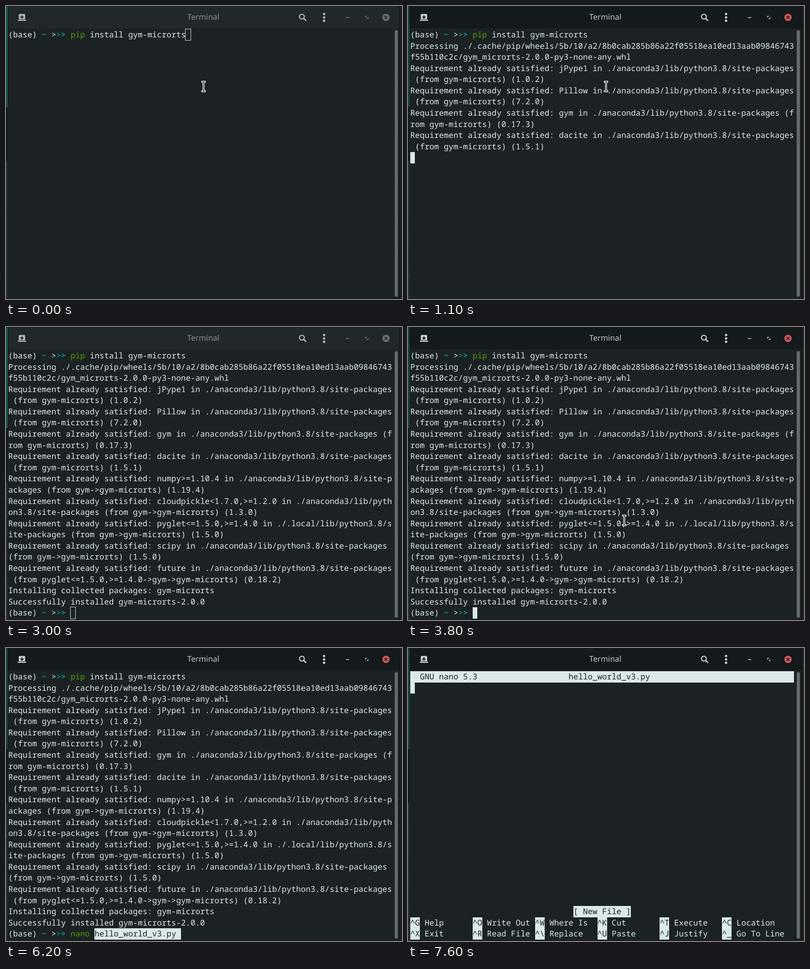
Animation of 869x644 px, one loop 8 s. Source, as an HTML page:

```html
<!DOCTYPE html>
<html lang="en">
<head>
<meta charset="utf-8">
<title>Terminal</title>
<style>
  :root { --bg: #1c2223; --fg: #dbe9e9; --dim: #5a6061; --cw: 10.5375px; --lh: 24.585px; --f: 0%; }
  html, body { margin: 0; width: 100%; height: 100%; overflow: hidden; background: #1c2223; }
  #stage { position: relative; width: 869px; height: 644px; overflow: hidden; background: #15191a; }
  #stage > * { position: absolute; }
  .hatch { background: repeating-linear-gradient(45deg, #363b3c 0 1.5px, #24292a 1.5px 4px); }
  #left { left: 0; top: 340px; width: 3px; height: 304px; }
  #right { left: 863px; top: 0; width: 6px; height: 644px; }
  #shade { left: 863px; top: 0; width: 6px; height: 644px; background: linear-gradient(90deg, #0009, #0002); }
  #edge { left: 1px; top: 1px; width: 2px; height: 221px;
    background: color-mix(in srgb, #16594c var(--f), #1c7c6a); }
  #win { left: 3px; top: 1px; width: 860px; height: 642px; background: var(--bg); border-radius: 3px 3px 0 0; }
  #bar { left: 3px; top: 1px; width: 860px; height: 48px; border-radius: 3px 3px 0 0;
    background: color-mix(in srgb, #14191b var(--f), #20282a); }
  #title { left: 333px; top: 13px; width: 200px; text-align: center; font: 17.2px/24px "Noto Sans", sans-serif;
    text-rendering: geometricPrecision; color: color-mix(in srgb, #c3caca var(--f), #8b9293); }
  #icons { left: 0; top: 0; }
  .strong { color: color-mix(in srgb, #cbd1d1 var(--f), #b3b9ba); }
  .weak { color: color-mix(in srgb, #929899 var(--f), #5d6566); }
  .close { color: color-mix(in srgb, #cc575d var(--f), #646b6c); }
  .hole { color: color-mix(in srgb, #14191b var(--f), #20282a); }
  #scroll { left: 852.5px; top: 53px; width: 7px; height: 586px; border-radius: 3.5px; background: #626a6a; }
  #text, #cursor { margin: 0; font: 17.5625px/var(--lh) "Noto Sans Mono", monospace; white-space: pre;
    text-rendering: geometricPrecision; font-variant-ligatures: none; font-kerning: none; color: var(--fg); }
  #text { left: 4.9px; top: 51px; }
  #text div { height: var(--lh); }
  #cursor { width: var(--cw); height: var(--lh); color: var(--bg); background: var(--fg); }
  #cursor.dim { background: var(--dim); }
  #cursor.hollow { background: none; margin: -1.3px; border: 1.3px solid var(--fg); }
  #cursor.off { display: none; }
  .c { color: #06989a; }
  .g { color: #4e9a06; }
  .r { color: #cc0000; }
  .d { color: var(--dim); }
  .i { display: inline-block; height: var(--lh); vertical-align: top; color: var(--bg); background: var(--fg); }
  b { font-weight: 700; }
  #mouse { left: 0; top: 0; overflow: visible; }
</style>
</head>
<body>
<div id="stage">
  <div id="left" class="hatch"></div>
  <div id="right" class="hatch"></div>
  <div id="shade"></div>
  <div id="edge"></div>
  <div id="win"></div>
  <div id="bar"></div>
  <div id="title">Terminal</div>
  <svg id="icons" width="869" height="50">
    <g class="strong" fill="currentColor">
      <path d="M28 29V19.5Q28 17.5 30 17.5H40Q42 17.5 42 19.5V29ZM26 30H44V32.5H26Z"/>
      <circle cx="698" cy="17.6" r="2.6"/><circle cx="698" cy="25" r="2.6"/><circle cx="698" cy="32.4" r="2.6"/>
      <path d="M653.5 27.5L658.5 32.5" stroke="currentColor" stroke-width="2.8"/>
      <circle cx="649.3" cy="23.4" r="5.3" fill="none" stroke="currentColor" stroke-width="2.3"/>
    </g>
    <path class="hole" d="M35 20.5V28M31.2 24.3H38.8" stroke="currentColor" stroke-width="2.2"/>
    <path class="weak" fill="currentColor" d="M745.8 24.3H753.3V26.4H745.8ZM788 21.6H793L788 26.6ZM795.5 28.8V23.8L790.5 28.8Z"/>
    <circle class="close" cx="833.9" cy="25" r="8" fill="currentColor"/>
    <path class="hole" d="M831 22.1L836.8 27.9M836.8 22.1L831 27.9" stroke="currentColor" stroke-width="2"/>
  </svg>
  <div id="scroll"></div>
  <pre id="text"></pre>
  <div id="cursor"></div>
  <svg id="mouse" width="1" height="1">
    <g fill="none" stroke-linecap="square">
      <path id="beam" d="M-2.8 -10.4H2.8M0 -10.4V10.4M-2.8 10.4H2.8" stroke="#fff" stroke-width="3.6"/>
      <use href="#beam"/>
      <path d="M-2.8 -10.4H2.8M0 -10.4V10.4M-2.8 10.4H2.8" stroke="#15191a" stroke-width="1.3"/>
    </g>
  </svg>
</div>
<script>
const LOOP = 8000, STEP = 100, CW = 10.5375, LH = 24.585, COLS = 80;
const $ = id => document.getElementById(id);
const esc = s => s.replace(/&/g, '&amp;').replace(/</g, '&lt;');
const span = (cls, s) => `<span class="${cls}">${esc(s)}</span>`;
const bold = (cls, s) => `<b class="${cls}">${esc(s)}</b>`;
const row = html => `<div>${html}</div>`;

// Terminal output, wrapped at the window width
const CONDA = './anaconda3', LOCAL = './.local';
const need = (pkg, ver, via = 'gym-microrts', dir = CONDA) =>
  `Requirement already satisfied: ${pkg} in ${dir}/lib/python3.8/site-packages (from ${via}) (${ver})`;
const viaGym = 'gym->gym-microrts';
const wrap = s => s.match(new RegExp(`.{1,${COLS}}`, 'g'));
const output = [
  'Processing ./.cache/pip/wheels/5b/10/a2/8b0cab285b86a22f05518ea10ed13aab09846743f55b110c2c/gym_microrts-2.0.0-py3-none-any.whl',
  need('jPype1', '1.0.2'),
  need('Pillow', '7.2.0'),
  need('gym', '0.17.3'),
  need('dacite', '1.5.1'),
  need('numpy>=1.10.4', '1.19.4', viaGym),
  need('cloudpickle<1.7.0,>=1.2.0', '1.3.0', viaGym),
  need('pyglet<=1.5.0,>=1.4.0', '1.5.0', viaGym, LOCAL),
  need('scipy', '1.5.0', viaGym),
  need('future', '0.18.2', 'pyglet<=1.5.0,>=1.4.0->' + viaGym),
  'Installing collected packages: gym-microrts',
  'Successfully installed gym-microrts-2.0.0'
].flatMap(wrap).map(s => row(esc(s)));

const prompt = '(base) ' + bold('c', '~') + ' >' + span('c', '>') + bold('c', '>') + ' ';
const first = row(prompt + span('g', 'pip') + ' install gym-microrts');

// Editor screen
const FILE = 'hello_world_v3.py';
const keys = list => row(list.map(([k, label]) =>
  span('i', k) + esc((' ' + label).padEnd(11))).join(''));
const editor =
  row(span('i', ('  GNU nano 5.3'.padEnd(33) + FILE).padEnd(COLS))) +
  row('').repeat(20) +
  row(' '.repeat(34) + span('i', '[ New File ]')) +
  keys([['^G', 'Help'], ['^O', 'Write Out'], ['^W', 'Where Is'], ['^K', 'Cut'], ['^T', 'Execute'], ['^C', 'Location']]) +
  keys([['^X', 'Exit'], ['^R', 'Read File'], ['^\\', 'Replace'], ['^U', 'Paste'], ['^J', 'Justify'], ['^_', 'Go To Line']]);

// Each table holds [start ms, value...]; the last started entry applies
const shown = [[0, 0], [1100, 10], [1200, 18], [1300, 20], [1800, 21], [2000, 22]];
const command = [
  [0, null],
  [2100, ''],
  [4600, bold('r', 'n')],
  [4700, bold('r', 'n') + span('d', 'ano hello.py')],
  [4800, bold('r', 'na') + span('d', 'no hello.py')],
  [4900, bold('r', 'nan') + span('d', 'o hello.py')],
  [5200, span('g', 'nano') + span('d', ' hello.py')],
  [5400, span('g', 'nano') + ' ' + span('d', 'hello.py')],
  [5800, span('g', 'nano') + ' ' + span('i', FILE + ' ')]
];
const cursor = [
  [0, 37, 0, 'hollow'], [300, 37, 0, 'on'], [600, 0, 1, 'on'], [1100, 0, 11, 'on'], [1200, 0, 0, 'off'],
  [1800, 0, 22, 'on'], [2000, 0, 23, 'on'], [2100, 13, 23, 'on'], [2400, 0, 0, 'off'],
  [2600, 13, 23, 'hollow'], [3500, 13, 23, 'on'], [4300, 0, 0, 'off'],
  [4600, 14, 23, 'on'], [4700, 14, 23, 'dim', 'a'], [4800, 15, 23, 'dim', 'n'], [4900, 16, 23, 'dim', 'o'],
  [5200, 17, 23, 'dim'], [5400, 18, 23, 'dim', 'h'], [5800, 36, 23, 'on'], [6200, 0, 0, 'off'],
  [6800, 0, 1, 'on'], [7400, 0, 0, 'off'], [7600, 0, 1, 'on']
];
const focus = [
  [0, 0], [300, 35], [400, 80], [500, 100],
  [2600, 75], [2700, 40], [2800, 15], [2900, 4], [3000, 0],
  [3500, 35], [3600, 75], [3700, 95], [3800, 100]
];
const mouse = [
  [0, 433.5, 177], [100, 428.5, 177], [300, 431, 177], [400, 434.5, 177], [1200],
  [3600, 510, 440], [3700, 482, 430], [3800, 474.5, 425], [4600],
  [7400, 846, 432], [7500, 865, 426], [7600]
];
const at = (table, t) => table.findLast(e => e[0] <= t).slice(1);

function screen(t) {
  if (t >= 6800) return editor;
  const [cmd] = at(command, t);
  return first + output.slice(0, at(shown, t)[0]).join('') + (cmd === null ? '' : row(prompt + cmd));
}

function draw(t) {
  $('text').innerHTML = screen(t);
  $('stage').style.setProperty('--f', at(focus, t)[0] + '%');

  const [col, line, mode, char = ''] = at(cursor, t), c = $('cursor');
  c.className = mode;
  c.textContent = char;
  c.style.left = 4.9 + col * CW + 'px';
  c.style.top = 51 + line * LH + 'px';

  const [x, y] = at(mouse, t), m = $('mouse');
  m.style.display = x === undefined ? 'none' : '';
  if (x !== undefined) m.style.transform = `translate(${x}px, ${y}px)`;
}

let last = -1;
const start = performance.now();
function tick() {
  const t = Math.floor((performance.now() - start) % LOOP / STEP) * STEP;
  if (t !== last) draw(last = t);
  requestAnimationFrame(tick);
}
tick();
</script>
</body>
</html>
```
